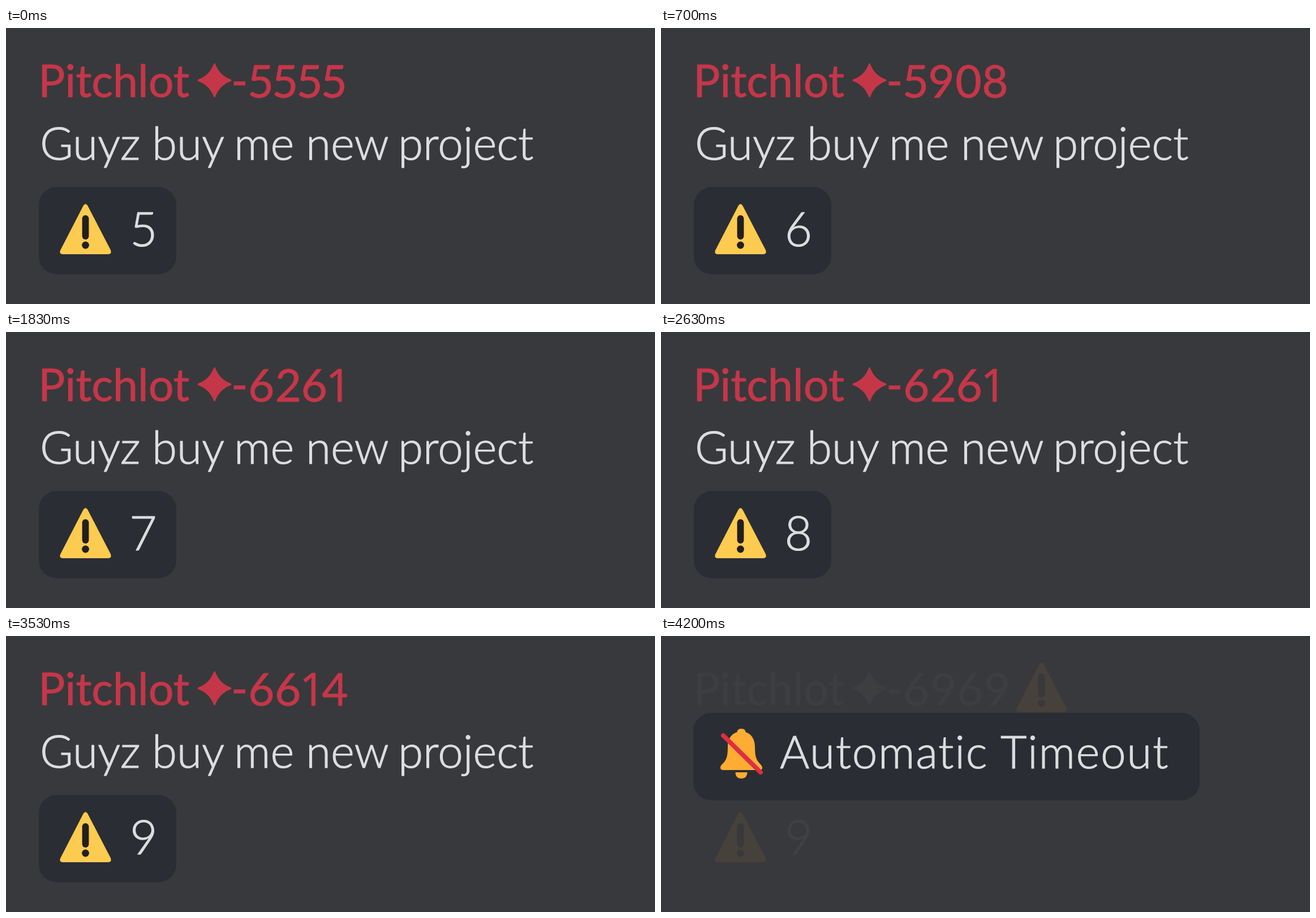
An HTML page with a canvas for the animation above (7.26 s loop, 1147 by 488 pixels).

```html
<!DOCTYPE html>
<html lang="en">
<head>
<meta charset="utf-8">
<title>Automatic Timeout</title>
<style>
  html, body { margin: 0; width: 100%; height: 100%; overflow: hidden; background: #38393c; }
  canvas { display: block; }
</style>
</head>
<body>
<canvas id="stage" width="1147" height="488"></canvas>
<script>
const ctx = document.getElementById('stage').getContext('2d');
const LOOP = 7260;
const BG = '#38393c', PANEL = '#2b2d34', TEXT = '#dcddde', RED = '#c63649';
const GHOST = '#3d3e40', GHOST_COUNT = '#404144';
const LIGHT = { weight: 300, size: 80, bold: 1.2 };
const MEDIUM = { weight: 400, size: 79, bold: 0.9 };

// [start time, value]
const COUNTS = [[0, '5'], [500, '6'], [1730, '7'], [2630, '8'], [3530, '9']];
const TAGS = [[0, '5555'], [700, '5908'], [1830, '6261'], [2760, '6614'], [3600, '6969']];
const ALERT_AT = 3630, TIMEOUT_AT = 4200;

// Proportional advances for the tag digits
const ADVANCE = { 0: 48, 1: 28, 2: 46.5, 4: 62, 5: 43.3, 6: 47, 8: 46, 9: 48 };

const MESSAGE = [['Guyz', 64], ['buy', 264], ['me', 409], ['new', 536], ['project', 699]];
const NOTICE = [['Automatic', 211], ['Timeout', 601]];

const valueAt = (steps, t) => steps.filter(s => s[0] <= t).pop()[1];

// Places text by the edge or the middle of its ink
function write(str, x, y, color, { weight, size, bold, centered = false, spacing = 0, face = 'Lato' }) {
  ctx.font = `${weight} ${size}px ${face}, "Open Sans", sans-serif`;
  ctx.letterSpacing = spacing + 'px';
  const m = ctx.measureText(str);
  const left = m.actualBoundingBoxLeft;
  const px = centered ? x - (m.actualBoundingBoxRight - left) / 2 : x + left;
  ctx.fillStyle = ctx.strokeStyle = color;
  ctx.lineWidth = bold;
  ctx.lineJoin = 'round';
  ctx.fillText(str, px, y);
  ctx.strokeText(str, px, y);
}

function writeWords(words, y, spacing) {
  for (const [word, x] of words) write(word, x, y, TEXT, { ...LIGHT, spacing });
}

function box(x, y, w, h, r, color) {
  ctx.fillStyle = color;
  ctx.beginPath();
  ctx.roundRect(x, y, w, h, r);
  ctx.fill();
}

function star(cx, cy, r, color) {
  const k = 7.5;
  ctx.fillStyle = ctx.strokeStyle = color;
  ctx.lineWidth = 3;
  ctx.lineJoin = 'round';
  ctx.beginPath();
  ctx.moveTo(cx, cy - r);
  ctx.quadraticCurveTo(cx + k, cy - k, cx + r, cy);
  ctx.quadraticCurveTo(cx + k, cy + k, cx, cy + r);
  ctx.quadraticCurveTo(cx - k, cy + k, cx - r, cy);
  ctx.quadraticCurveTo(cx - k, cy - k, cx, cy - r);
  ctx.closePath();
  ctx.fill();
  ctx.stroke();
}

function warning(cx, top, scale, fill, mark) {
  ctx.save();
  ctx.translate(cx, top);
  ctx.scale(scale, scale);
  ctx.fillStyle = fill;
  ctx.beginPath();
  ctx.moveTo(-45, 83);
  ctx.lineTo(-4, 3.5);
  ctx.quadraticCurveTo(0, -3, 4, 3.5);
  ctx.lineTo(44.4, 81.5);
  ctx.quadraticCurveTo(47.2, 89, 40, 89);
  ctx.lineTo(-40, 89);
  ctx.quadraticCurveTo(-47.2, 89, -44.4, 81.5);
  ctx.closePath();
  ctx.fill();
  box(-5.9, 20, 11.8, 43, 5.9, mark);
  ctx.beginPath();
  ctx.arc(0, 73, 6.4, 0, Math.PI * 2);
  ctx.fill();
  ctx.restore();
}

const bellBody = new Path2D(
  'M142 169C157 169 166 180 166 196C166 212 168 219 175 226Q179 230 179 233Q179 237 174 237' +
  'H110Q105 237 105 233Q105 229 109 226C116 219 118 212 118 196C118 180 127 169 142 169Z' +
  'M131.5 241H152.5Q152 252 142 252Q132 252 131.5 241Z');

function mutedBell() {
  box(134.5, 164, 15, 16, 6, '#ffac33');
  ctx.fill(bellBody);
  ctx.strokeStyle = '#dd2e44';
  ctx.lineWidth = 8;
  ctx.lineCap = 'round';
  ctx.beginPath();
  ctx.moveTo(110, 176);
  ctx.lineTo(176, 241);
  ctx.stroke();
}

function userName(tag, color) {
  write('Pitchlot', 64, 122, color, MEDIUM);
  star(368.5, 92.5, 28.5, color);
  write('-', 402, 122, color, MEDIUM);
  let x = 428;
  for (const d of tag) {
    const face = d === '1' ? '"Open Sans"' : 'Lato';
    write(d, x + ADVANCE[d] / 2, 122.5, color, { ...MEDIUM, size: 80, centered: true, face });
    x += ADVANCE[d];
  }
}

function draw(t) {
  const muted = t >= TIMEOUT_AT;
  const fill = muted ? '#46413a' : '#fdcb50';
  const mark = muted ? '#38393b' : '#231f20';

  ctx.fillStyle = BG;
  ctx.fillRect(0, 0, 1147, 488);

  userName(valueAt(TAGS, t), muted ? GHOST : RED);
  if (t >= ALERT_AT) warning(672.5, 46.5, 0.99, fill, mark);

  if (!muted) {
    writeWords(MESSAGE, 233, 0);
    box(58, 281, 243, 154.5, 32, PANEL);
  }
  warning(140.5, 311, 1, fill, mark);
  write(valueAt(COUNTS, t), 243, 386, muted ? GHOST_COUNT : TEXT, { ...LIGHT, size: 84, centered: true });

  if (muted) {
    box(57, 136, 895, 154.5, 32, PANEL);
    mutedBell();
    writeWords(NOTICE, 234, 1.7);
  }
}

const start = performance.now();
function tick() {
  draw((performance.now() - start) % LOOP);
  requestAnimationFrame(tick);
}
tick();
</script>
</body>
</html>
```
